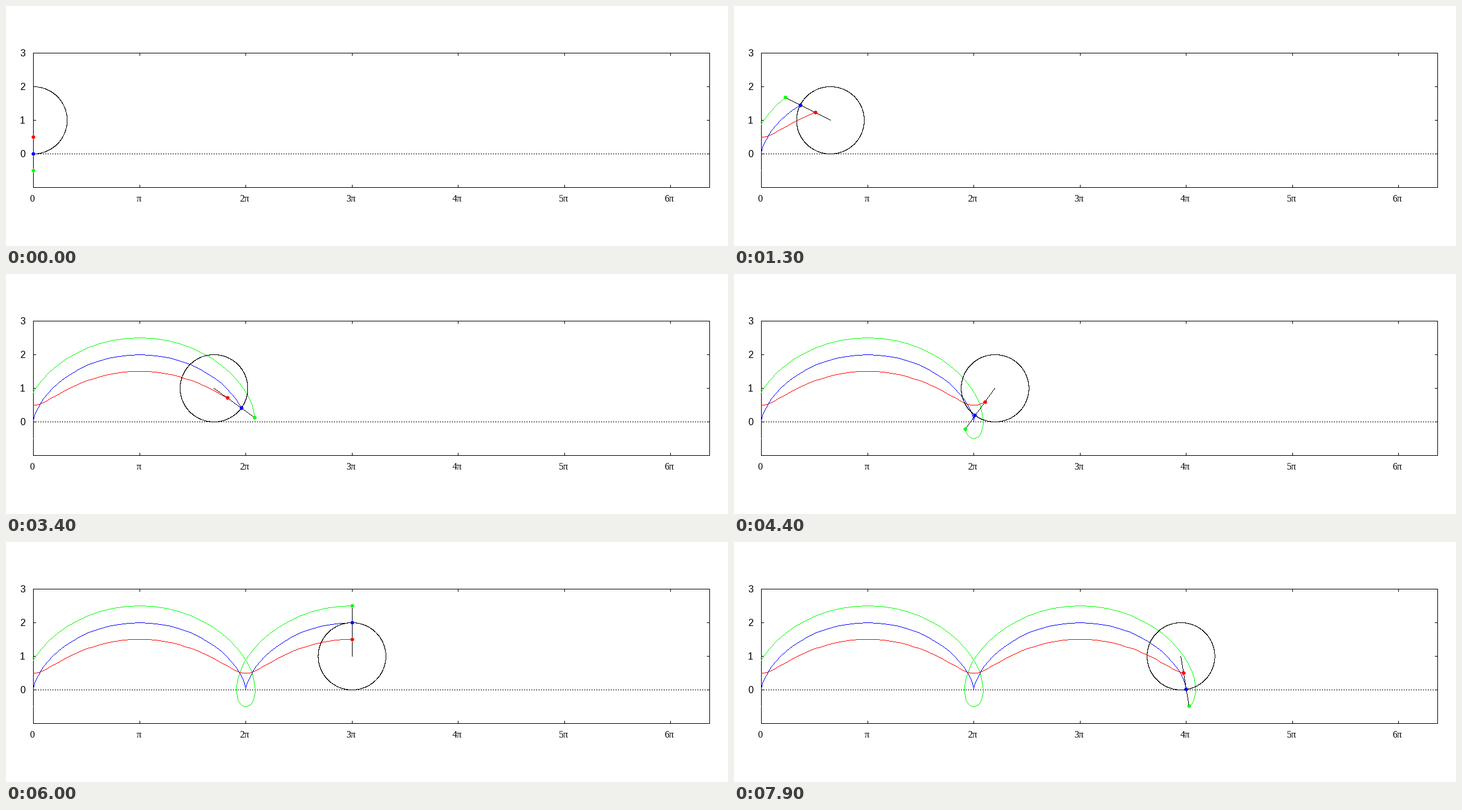
Animation, 1200 px wide and 400 px high, one loop 8 s. Source, as a matplotlib script:

```python
import numpy as np
import matplotlib.pyplot as plt
from matplotlib.animation import FuncAnimation

W, H, DPI = 1200, 400, 100
LEFT, RIGHT, TOP, BOTTOM = 45, 1169, 78, 302
UNIT_X, UNIT_Y, ZERO_Y = 56.2, 56.0, 246
FRAMES, STEP = 80, np.pi / 20
PX = 72 / DPI
ARMS = ((1.5, "#00ff00"), (1.0, "#0000ff"), (0.5, "#ff0000"))

plt.rcParams["path.simplify"] = False
fig = plt.figure(figsize=(W / DPI, H / DPI), dpi=DPI, facecolor="white")
ax = fig.add_axes([0, 0, 1, 1])
ax.set_xlim(0, W)
ax.set_ylim(H, 0)
ax.axis("off")


def to_px(x, y):
    """Plot units to whole stage pixels, shape (n, 2)."""
    px = np.floor(LEFT + UNIT_X * np.asarray(x) + 0.5)
    py = np.floor(ZERO_Y - UNIT_Y * np.asarray(y) + 0.5)
    return np.stack([px, py], axis=-1)


def segment(a, b):
    """Pixels of a crisp one-pixel line from a to b."""
    n = int(max(abs(b - a))) + 1
    return np.floor(np.linspace(a, b, n) + 0.5)


def pixel_art(color, z):
    line, = ax.plot([], [], color=color, lw=PX, zorder=z, antialiased=False,
                    solid_capstyle="butt", snap=False)
    return line


def set_pixels(line, pts):
    """Show each pixel at or right of the left border as a one-pixel dash."""
    pts = pts[pts[:, 0] >= LEFT]
    x, y = pts[:, 0], pts[:, 1] + 0.5
    gap = np.full(len(pts), np.nan)
    line.set_data(np.stack([x, x + 1, gap], 1).ravel(),
                  np.stack([y, y, gap], 1).ravel())


def wheel_point(t, arm):
    return t - arm * np.sin(t), 1 - arm * np.cos(t)


def draw_box():
    strokes = [((LEFT, TOP), (RIGHT, TOP)), ((LEFT, BOTTOM), (RIGHT, BOTTOM)),
               ((LEFT, TOP), (LEFT, BOTTOM)), ((RIGHT, TOP), (RIGHT, BOTTOM))]
    for n in range(7):
        x = to_px(n * np.pi, 0)[0]
        strokes += [((x, TOP), (x, TOP + 4)), ((x, BOTTOM - 4), (x, BOTTOM))]
        name = "0" if n == 0 else "π" if n == 1 else f"{n}π"
        ax.text(x - (2 if n == 0 else 1.5), 326, name, ha="center",
                va="baseline", family="Liberation Serif", size=16 * PX)
    for n in range(4):
        y = to_px(0, n)[1]
        strokes += [((LEFT, y), (LEFT + 4, y)), ((RIGHT - 4, y), (RIGHT, y))]
        ax.text(32, y + 6, str(n), ha="right", va="baseline",
                family="Liberation Sans", size=16 * PX)
    pts = [segment(np.array(a), np.array(b)) for a, b in strokes]
    xs = np.arange(LEFT, RIGHT + 1)
    xs = xs[(xs - LEFT) % 4 < 2]
    pts.append(np.stack([xs, np.full(len(xs), ZERO_Y)], 1))
    set_pixels(pixel_art("black", 1), np.concatenate(pts))


draw_box()

# Trail pixels grow by one chord per frame
knots = np.arange(FRAMES) * STEP
trails = []
for arm, _ in ARMS:
    p = to_px(*wheel_point(knots, arm))
    trails.append([p[:1]] + [segment(a, b) for a, b in zip(p, p[1:])])

g = np.arange(-3, 4)
disc = np.array([(x, y) for x in g for y in g if x * x + y * y <= 9])
angle = np.linspace(0, 2 * np.pi, 1500)

curves = [pixel_art(c, 2) for _, c in ARMS]
rim = pixel_art("black", 3)
spoke = pixel_art("black", 4)
dots = [pixel_art(c, 5) for _, c in ARMS]


def update(k):
    t = k * STEP
    set_pixels(rim, to_px(t + np.cos(angle), 1 + np.sin(angle)))
    set_pixels(spoke, segment(to_px(t, 1), to_px(*wheel_point(t, ARMS[0][0]))))
    for (arm, _), trail, curve, dot in zip(ARMS, trails, curves, dots):
        set_pixels(curve, np.concatenate(trail[:k + 1]))
        x, y = to_px(*wheel_point(t, arm))
        pts = disc + (x, y)
        px, py = pts[:, 0], pts[:, 1] + 0.5
        gap = np.full(len(pts), np.nan)
        dot.set_data(np.stack([px, px + 1, gap], 1).ravel(),
                     np.stack([py, py, gap], 1).ravel())
        dot.set_visible(bool(x >= LEFT))
    return [rim, spoke, *curves, *dots]


anim = FuncAnimation(fig, update, frames=FRAMES, interval=100,
                     repeat=True, repeat_delay=0, blit=False)
plt.show()
```
